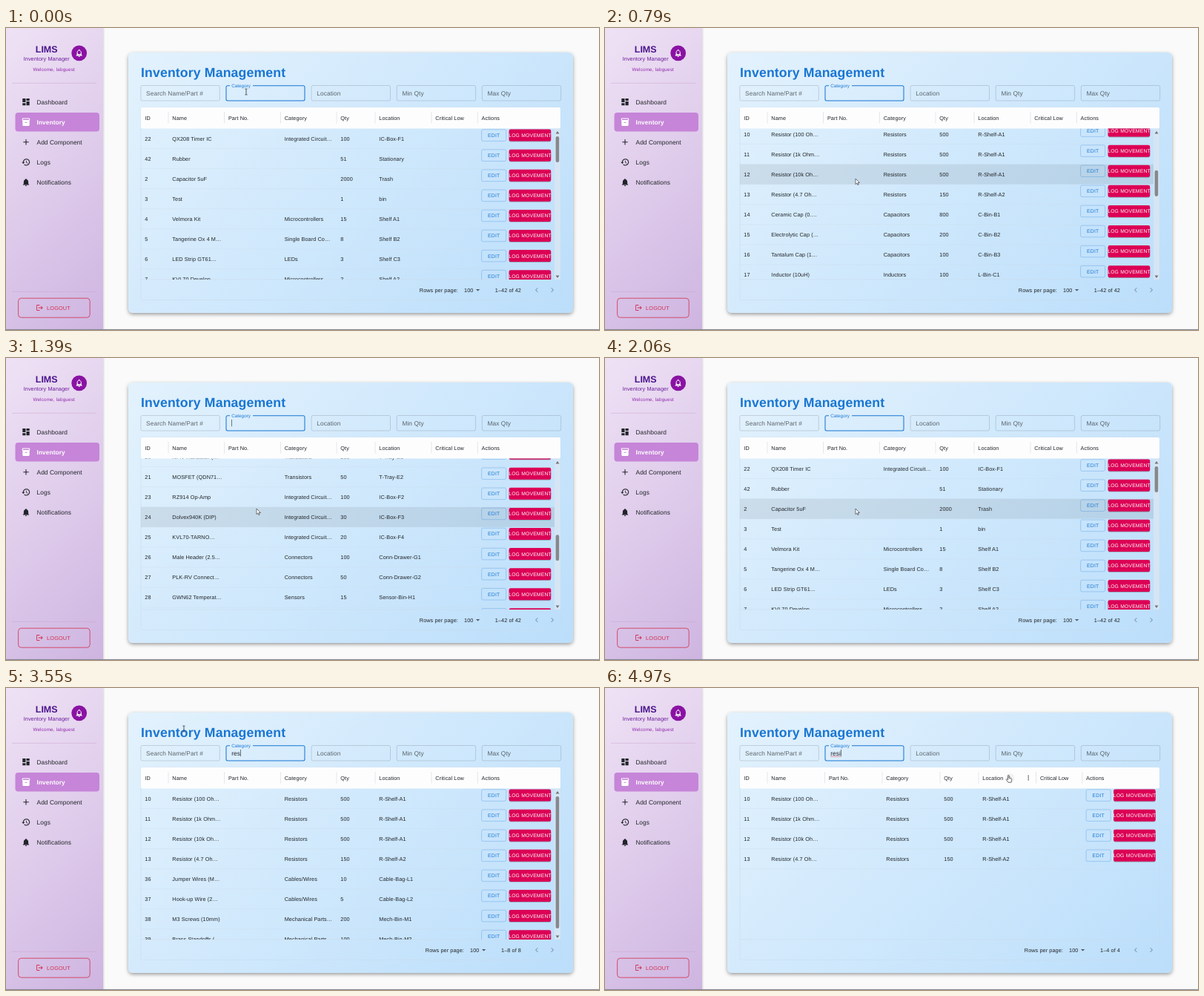
Animation of 800 by 407 pixels, one loop 5000 ms. Source, as an HTML page:

```html
<!DOCTYPE html>
<html lang="en">
<head>
<meta charset="utf-8">
<title>Inventory Management</title>
<style>
html, body { margin: 0; width: 100%; height: 100%; overflow: hidden; background: #fafafa; }
svg { display: block; width: 100vw; height: 100vh; }
text { font-family: "Liberation Sans", Arial, sans-serif; text-rendering: geometricPrecision; white-space: pre; }
</style>
</head>
<body>
<svg id="stage" viewBox="0 0 800 407"></svg>
<script>
const LOOP = 5000, ROW = 27.083, TOP = 135.6, BOTTOM = 339, VIEW = BOTTOM - TOP;
const BLUE = '#1976d2', INK = '#212529', BODY = 7.29, INPUT = 8.33;
const HEADERS = ['ID', 'Name', 'Part No.', 'Category', 'Qty', 'Location', 'Critical Low', 'Actions'];
const NARROW = [182, 219, 294.6, 370.4, 446, 498, 574, 636.3];
const WIDE = [182, 219, 296.6, 374, 452, 504, 581.6, 643.8];
const TOTALS = { '': 42, r: 29, re: 8, res: 6, resi: 4 };

// id | name | category (text after ~ is cut off) | quantity | location
const ITEMS = `22|QX208 Timer IC|Integrated Circuit~s|100|IC-Box-F1
42|Rubber||51|Stationary
2|Capacitor 5uF||2000|Trash
3|Test||1|bin
4|Velmora Kit|Microcontrollers|15|Shelf A1
5|Tangerine Ox 4 M…|Single Board Co~mputers|8|Shelf B2
6|LED Strip GT61…|LEDs|3|Shelf C3
7|KVL70 Develop…|Microcontrollers|2|Shelf A2
8|Breadboard 830 …|Prototyping|1|Shelf B3
9|Jumper Wires Set|Connectors|0|Shelf C1
10|Resistor (100 Oh…|Resistors|500|R-Shelf-A1
11|Resistor (1k Ohm…|Resistors|500|R-Shelf-A1
12|Resistor (10k Oh…|Resistors|500|R-Shelf-A1
13|Resistor (4.7 Oh…|Resistors|150|R-Shelf-A2
14|Ceramic Cap (0.…|Capacitors|800|C-Bin-B1
15|Electrolytic Cap (…|Capacitors|200|C-Bin-B2
16|Tantalum Cap (1…|Capacitors|100|C-Bin-B3
17|Inductor (10uH)|Inductors|100|L-Bin-C1
18|Rectifier Diode (…|Diodes|300|D-Tray-D1
19|Zener Diode (5.1…|Diodes|150|D-Tray-D2
20|NPN Transistor (…|Transistors|200|T-Tray-E1
21|MOSFET (QDN71…|Transistors|50|T-Tray-E2
23|RZ914 Op-Amp|Integrated Circuit~s|100|IC-Box-F2
24|Dolvex940K (DIP)|Integrated Circuit~s|30|IC-Box-F3
25|KVL70-TARNO…|Integrated Circuit~s|20|IC-Box-F4
26|Male Header (2.5…|Connectors|100|Conn-Drawer-G1
27|PLK-RV Connect…|Connectors|50|Conn-Drawer-G2
28|GWN62 Temperat…|Sensors|15|Sensor-Bin-H1
29|Ultrasonic Dista…|Sensors|10|Sensor-Bin-H2
30|PIR Motion Sens…|Sensors|12|Sensor-Bin-H3
31|Push Button (6m…|Switches|100|Switch-Bin-I1
32|Toggle Switch (S…|Switches|40|Switch-Bin-I2
33|LCD Display (16x…|Displays|10|Disp-Shelf-J1
34|OLED Display (0.…|Displays|8|Disp-Shelf-J2
35|Battery Holder (…|Batteries|25|Power-Box-K1
36|Jumper Wires (M…|Cables/Wires|10|Cable-Bag-L1
37|Hook-up Wire (2…|Cables/Wires|5|Cable-Bag-L2
38|M3 Screws (10mm)|Mechanical Parts~/Hardware|200|Mech-Bin-M1
39|Brass Standoffs (…|Mechanical Parts~/Hardware|100|Mech-Bin-M2`
  .split('\n').map(line => line.split('|'));

const ICONS = {
  bell: 'M12 22c1.1 0 2-.9 2-2h-4c0 1.1.89 2 2 2zm6-6v-5c0-3.07-1.64-5.64-4.5-6.32V4c0-.83-.67-1.5-1.5-1.5s-1.5.67-1.5 1.5v.68C7.63 5.36 6 7.92 6 11v5l-2 2v1h16v-1l-2-2z',
  dashboard: 'M3 13h8V3H3v10zm0 8h8v-6H3v6zm10 0h8V11h-8v10zm0-18v6h8V3h-8z',
  box: 'M20 2H4c-1 0-2 .9-2 2v3c0 .7.4 1.3 1 1.7V20c0 1.1 1.1 2 2 2h14c.9 0 2-.9 2-2V8.7c.6-.4 1-1 1-1.7V4c0-1.1-1-2-2-2zm-5 12H9v-2h6v2zm5-7H4V4h16v3z',
  plus: 'M19 13h-6v6h-2v-6H5v-2h6V5h2v6h6v2z',
  history: 'M13 3c-4.97 0-9 4.03-9 9H1l3.9 3.9.1.1L9 12H6c0-3.87 3.13-7 7-7s7 3.13 7 7-3.13 7-7 7c-1.93 0-3.68-.79-4.94-2.06l-1.42 1.42C8.27 19.99 10.51 21 13 21c4.97 0 9-4.03 9-9s-4.03-9-9-9zm-1 5v5l4.28 2.54.72-1.21-3.5-2.08V8H12z',
  logout: 'M17 7l-1.41 1.41L18.17 11H8v2h10.17l-2.58 2.58L17 17l5-5zM4 5h8V3H4c-1.1 0-2 .9-2 2v14c0 1.1.9 2 2 2h8v-2H4V5z',
  prev: 'M15.4 7.4 14 6l-6 6 6 6 1.4-1.4L10.8 12z',
  next: 'M10 6 8.6 7.4l4.6 4.6-4.6 4.6L10 18l6-6z',
  up: 'M4 12l1.4 1.4L11 7.8V20h2V7.8l5.6 5.6L20 12l-8-8z',
  more: 'M12 8a2 2 0 1 0 0-4 2 2 0 0 0 0 4zm0 2a2 2 0 1 0 0 4 2 2 0 0 0 0-4zm0 6a2 2 0 1 0 0 4 2 2 0 0 0 0-4z',
  drop: 'M7 10l5 5 5-5z'
};

// y is the vertical centre of the text
const text = (x, y, s, size = BODY, fill = INK, spacing = .0107, more = '') =>
  `<text x="${x}" y="${y + size * .36}" font-size="${size}" fill="${fill}" letter-spacing="${spacing}em" ${more}>${s}</text>`;
const rect = (x, y, w, h, fill, r = 0, more = '') =>
  `<rect x="${x}" y="${y}" width="${w}" height="${h}" rx="${r}" fill="${fill}" ${more}/>`;
const line = (x1, y1, x2, y2, color, w = .52) =>
  `<path d="M${x1} ${y1}L${x2} ${y2}" stroke="${color}" stroke-width="${w}"/>`;
const icon = (name, x, y, fill, size = 12.5) =>
  `<path d="${ICONS[name]}" fill="${fill}" transform="translate(${x - size / 2} ${y - size / 2}) scale(${size / 24})"/>`;
const outline = (color, w = .52) => `stroke="${color}" stroke-width="${w}"`;
const MIDDLE = 'text-anchor="middle"', BOLD = 'font-weight="700"';

// 135 degree gradient across a box
function diagonal(id, x, y, w, h, from, to) {
  const half = (w + h) / 4, cx = x + w / 2, cy = y + h / 2;
  return `<linearGradient id="${id}" gradientUnits="userSpaceOnUse" x1="${cx - half}" y1="${cy - half}" x2="${cx + half}" y2="${cy + half}">
    <stop stop-color="${from}"/><stop offset="1" stop-color="${to}"/></linearGradient>`;
}

function sidebar() {
  const nav = [['dashboard', 'Dashboard'], ['box', 'Inventory'], ['plus', 'Add Component'], ['history', 'Logs'], ['bell', 'Notifications']];
  return rect(0, 0, 131, 407, 'url(#side)', 0, 'filter="url(#soft)"') +
    text(54.7, 28, 'LIMS', 12.5, '#4a148c', 0, MIDDLE + ' ' + BOLD) +
    text(54.7, 41.5, 'Inventory Manager', BODY, '#6a1b9a', .0107, MIDDLE) +
    text(64.7, 56, 'Welcome, labguest', 6.25, '#8e24aa', .0333, MIDDLE) +
    `<circle cx="98.7" cy="33.8" r="10.4" fill="#8a12a3"/>` + icon('bell', 98.7, 33.8, '#fff') +
    rect(96.6, 30.6, 4.2, 5, '#8a12a3', 1.8) +
    line(8, 74.3, 122, 74.3, '#c9a3cf') + line(8, 355.4, 122, 355.4, '#c9a3cf') +
    rect(12.5, 114, 113.5, 25.4, '#c685d8', 4) +
    nav.map(([name, label], i) => {
      const y = 99.6 + i * ROW, on = i === 1;
      return icon(name, 27, y, on ? '#fff' : INK) + text(41.5, y, label, INPUT, on ? '#fff' : INK, .0094, on ? BOLD : '');
    }).join('') +
    rect(16.6, 364.2, 96.6, 26, 'none', 4, outline('#d32f4f', .8)) +
    icon('logout', 45.4, 377, '#d32f4f', 10.4) + text(55, 377, 'LOGOUT', BODY, '#d32f4f', .0286);
}

function card() {
  const fields = ['Search Name/Part #', '', 'Location', 'Min Qty', 'Max Qty'];
  return rect(165, 33, 600, 351, 'url(#card)', 6, 'filter="url(#shadow)"') +
    text(182, 59.7, 'Inventory Management', 17.7, BLUE, .0074, BOLD) +
    fields.map((label, i) => {
      const x = 181.9 + i * 115.1;
      return i === 1
        ? `<path d="M333 77.8H401a2 2 0 0 1 2 2V96a2 2 0 0 1-2 2H299a2 2 0 0 1-2-2V79.800a2 2 0 0 1 2-2h3" fill="none" ${outline(BLUE, 1.04)}/>`
        : rect(x, 77.5, 106.4, 20.5, 'none', 2, outline('rgba(0,0,0,.27)')) + text(x + 7.2, 87.8, label, INPUT, 'rgba(0,0,0,.58)', .0094);
    }).join('') +
    text(304.2, 77.3, 'Category', 6.25, BLUE, .0094) +
    rect(182, 107, 566, 259.5, 'none', 2, outline('#c9dbea')) +
    rect(182, 107, 566, 28.5, '#fdfdfe', 2) +
    line(182, BOTTOM, 748, BOTTOM, '#c9dbea');
}

function headerCells(cols) {
  return HEADERS.map((label, i) => text(cols[i] + 5.3, 121, label) +
    (i ? line(cols[i], 113, cols[i], 128.5, '#d9dde0', .7) : '')).join('');
}

function rowCells(items, cols) {
  return items.map(([id, name, category, qty, place], i) => {
    const y = 149 + i * ROW, by = y - 12.4, bx = cols[7] + 5;
    const shown = category.replace(/~.*/, '…');
    return [id, name, '', shown, qty, place].map((s, c) => s && text(cols[c] + 5.3, y, s)).join('') +
      rect(bx + .3, by + .2, 33, 15.6, 'none', 2, outline('rgba(25,118,210,.5)')) +
      text(bx + 16.9, by + 8, 'EDIT', 6.77, BLUE, .0286, MIDDLE) +
      rect(bx + 37.3, by + .9, 56.6, 16, 'rgba(0,0,0,.25)', 2.1) +
      rect(bx + 37.3, by, 56.6, 16, '#dc0055', 2.1) +
      text(bx + 65.7, by + 8, 'LOG MOVEMENT', 6.77, '#fff', .0286, MIDDLE) +
      line(182, y + 13.5, 748, y + 13.5, '#c9dbea', .4);
  }).join('');
}

function footer(total) {
  const shift = total > 9 ? 0 : 8;
  return text(557.8 + shift, 353, 'Rows per page:') + text(618 + shift, 353, '100') +
    icon('drop', 636.6 + shift, 353, '#4d5760') +
    text(695, 353, `1–${total} of ${total}`, BODY, INK, .0107, 'text-anchor="end"') +
    icon('prev', 716, 353, 'rgba(0,0,0,.3)') + icon('next', 737, 353, 'rgba(0,0,0,.3)');
}

const POINTERS = {
  arrow: '<path d="M0 0V7.600L1.800 6L3 8.600L4.200 8L3.100 5.500H5.400Z" fill="#fff" stroke="#222" stroke-width=".6"/>',
  beam: '<path d="M-1.600-4H-.4L0-3.600L.4-4H1.600M0-3.600V3.600M-1.600 4H-.4L0 3.600L.4 4H1.600" fill="none" stroke="#222" stroke-width=".75"/>',
  hand: '<path d="M-1.200-4q.8-.8 1.500 0V-.4L3.400.4Q4.200.8 4 2L3.200 5.400H-.8L-3.400 1.800Q-3.300.6-2.200 1L-1.200 2Z" fill="#fff" stroke="#222" stroke-width=".65" stroke-linejoin="round"/>'
};

const stage = document.getElementById('stage');
stage.innerHTML = `<defs>
  ${diagonal('side', 0, 0, 131, 407, '#efe2f5', '#ceb5e1')}
  ${diagonal('card', 165, 33, 600, 351, '#e3f2fd', '#bbdefb')}
  <filter id="soft"><feDropShadow dx="1" dy="0" stdDeviation="1.2" flood-opacity=".15"/></filter>
  <filter id="shadow" x="-5%" y="-5%" width="110%" height="112%"><feDropShadow dx="0" dy="2" stdDeviation="2.6" flood-opacity=".38"/></filter>
  <clipPath id="view"><rect x="182" y="${TOP}" width="566" height="${VIEW}"/></clipPath></defs>
  ${rect(0, 0, 800, 407, '#fafafa')}${sidebar()}${card()}
  <g id="head"></g><g id="headHover"></g>
  <g clip-path="url(#view)"><g id="scroller"><rect id="hover" x="182" width="566" height="${ROW}" fill="rgba(0,0,0,.075)"/><g id="rows"></g></g></g>
  <g id="bar">${rect(740, TOP, 8, VIEW, '#d5e5f3')}
    <path d="M741.500 142.500H746.500L744 139ZM741.500 333.500H746.500L744 337Z" fill="#70757a"/>
    <rect id="thumb" x="741.600" width="4.600" rx="2.300" fill="#85898d"/></g>
  <g id="foot"></g><g id="typed"></g><g id="pointer"></g>
  ${rect(0, 405.9, 800, 1.1, '#85858f')}`;
const el = Object.fromEntries([...stage.querySelectorAll('g[id], #hover, #thumb')].map(node => [node.id, node]));

// Piecewise interpolation over [time, ...values] keys
function track(keys, t, ease = u => u) {
  const next = keys.findIndex(key => key[0] > t);
  if (next < 0) return keys[keys.length - 1].slice(1);
  if (next === 0) return keys[0].slice(1);
  const a = keys[next - 1], b = keys[next], u = ease((t - a[0]) / (b[0] - a[0]));
  return a.slice(1).map((v, i) => v + (b[i + 1] - v) * u);
}
const smooth = u => u * u * (3 - 2 * u);

const SCROLL = [[460, 0], [790, 276], [1260, 680], [1390, 558.5], [2000, 0]];
const MOUSE = [[60, 324, 86], [400, 338, 203], [2850, 338, 203], [3450, 240, 55], [3950, 240, 55], [4700, 544.8, 121.800]];
const KEYS = [2420, 3180, 3500, 3850], LAG = 130;
const typedAt = t => 'resi'.slice(0, KEYS.filter(k => k <= t).length);

function pointerKind(x, y) {
  if (x > 182 && x < 748) {
    if (y > 107 && y < TOP) return 'hand';
    if (y > 77 && y < 98) return 'beam';
  }
  return x > 182 && x < 378 && y > 50 && y < 70 ? 'beam' : 'arrow';
}

let shownQuery = null, cols, count;
function applyFilter(query) {
  if (query === shownQuery) return;
  shownQuery = query;
  const items = ITEMS.filter(item => item[2].toLowerCase().includes(query));
  count = TOTALS[query];
  cols = count * ROW > VIEW ? NARROW : WIDE;
  el.head.innerHTML = headerCells(cols);
  el.rows.innerHTML = rowCells(items, cols);
  el.foot.innerHTML = footer(count);
}

function drawTyped(t) {
  const word = typedAt(t), lastKey = KEYS.filter(k => k <= t).pop() ?? 1100 - 2120;
  const lit = (t - lastKey) % 1060 < 530;
  const width = [0, 2.8, 7.6, 11.8, 13.7][word.length];
  const wave = word === 'resi' && t > 4100
    ? `<path d="M304 92.300${'q.5-.9 1 0t1 0'.repeat(7)}" fill="none" ${outline('#e53935', .6)}/>` : '';
  el.typed.innerHTML = text(304.2, 87.8, word, INPUT, INK, .0094) + wave +
    (lit ? rect(304.3 + width, 83, .6, 9.2, '#222') : '');
}

function drawHeaderHover(x, y) {
  let html = '';
  if (y > 107 && y < TOP) {
    const c = cols.findLastIndex(left => left < x);
    if (c >= 0 && c < 7) {
      const label = el.head.querySelectorAll('text')[c];
      const end = cols[c] + 5.3 + label.getComputedTextLength();
      html = `<circle cx="${end + 9}" cy="121.500" r="6.500" fill="rgba(0,0,0,.04)"/>` +
        icon('up', end + 8, 121.2, 'rgba(0,0,0,.3)', 9.4) + icon('more', cols[c + 1] - 10.4, 121.2, '#555', 10);
    }
  }
  el.headHover.innerHTML = html;
}

function render(t) {
  applyFilter(typedAt(t - LAG));
  const [scroll] = track(SCROLL, t), [x, y] = track(MOUSE, t, smooth);
  const content = count * ROW, hovered = Math.floor((y - TOP + scroll) / ROW);
  const inRows = y > TOP && y < BOTTOM && x > 182 && x < 748 && hovered < count;
  el.scroller.setAttribute('transform', `translate(0 ${-scroll})`);
  el.hover.setAttribute('y', TOP + hovered * ROW);
  el.hover.setAttribute('visibility', inRows ? 'visible' : 'hidden');
  el.bar.setAttribute('visibility', content > VIEW ? 'visible' : 'hidden');
  el.thumb.setAttribute('y', 146 + 188 * scroll / content);
  el.thumb.setAttribute('height', Math.min(188, 188 * VIEW / content + 1.5));
  drawTyped(t);
  drawHeaderHover(x, y);
  el.pointer.innerHTML = POINTERS[pointerKind(x, y)];
  el.pointer.setAttribute('transform', `translate(${x} ${y})`);
}

const start = performance.now();
function tick() {
  render((performance.now() - start) % LOOP);
  requestAnimationFrame(tick);
}
tick();
</script>
</body>
</html>
```
